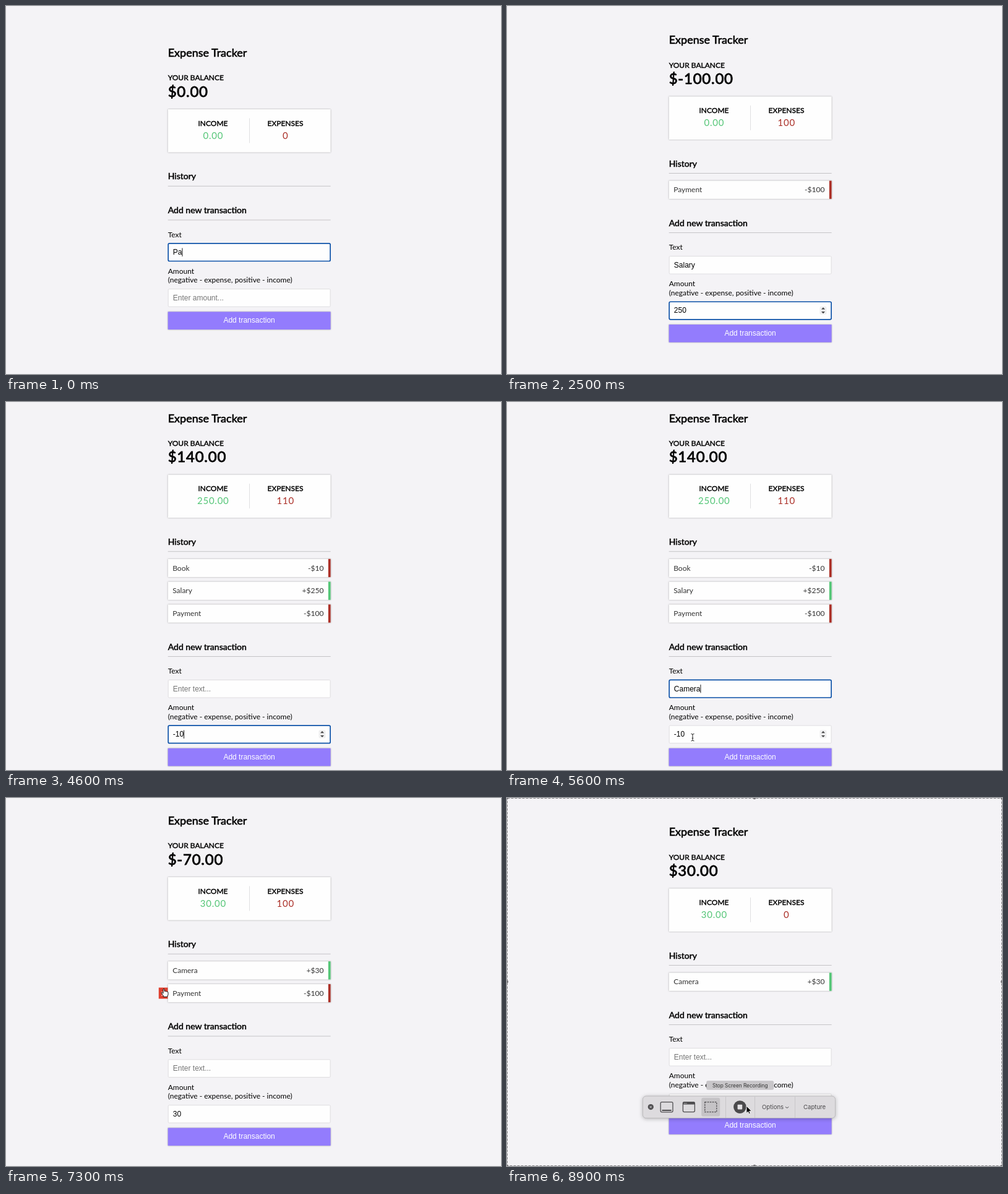
Animation of 800x595 px, one loop 9 s. Source, as an HTML page:

```html
<!DOCTYPE html>
<html lang="en">
<head>
<meta charset="utf-8">
<title>Expense Tracker</title>
<style>
  html, body { margin: 0; width: 100%; height: 100%; overflow: hidden; background: #f4f3f6; }
  svg { display: block; width: 800px; height: 595px; font: 12px Lato, sans-serif; }
  text { white-space: pre; }
  .bold { stroke: #000; stroke-width: .035em; }
  .mid { text-anchor: middle; }
  .end { text-anchor: end; }
  .money { font-size: 15px; letter-spacing: .75px; }
  .arial { font-family: "Liberation Sans", Arial, sans-serif; }
  .ui { font: 9.6px Inter, sans-serif; fill: #4a494b; }
  .raised { filter: drop-shadow(0 .75px .8px rgba(0,0,0,.26)) drop-shadow(0 .3px .8px rgba(0,0,0,.1)); }
  .icon { fill: none; stroke: #4f4e50; stroke-width: 1.3; }
</style>
</head>
<body>
<svg id="stage" viewBox="0 0 800 595"></svg>
<script>
const LOOP = 9000, FRAME = 100;
const LEFT = 261.7, WIDTH = 262.9, RIGHT = LEFT + WIDTH;
const GREEN = '#54c677', RED = '#ab2f27';
const stage = document.getElementById('stage');
const ruler = document.createElement('canvas').getContext('2d');
ruler.font = '12px "Liberation Sans", Arial, sans-serif';

// ---- Script of the session: state changes in order of time ----
const steps = [];
const at = (t, patch) => steps.push({ t, patch });
const typeIn = (t, field, text, every, from = 1) => {
  for (let i = from; i <= text.length; i++)
    at(t + (i - from) * every, { focus: field, [field]: text.slice(0, i) });
};
let history = [];
const add = (t, name, value, focus) => {
  history = [{ name, value }, ...history];
  at(t, { list: history, text: '', focus });
};
const removeSecond = t => {
  history = history.filter((_, i) => i !== 1);
  at(t, { list: history });
};

at(0, { text: 'Pa', amount: '', focus: 'text', list: [] });
typeIn(100, 'text', 'Payment', 60, 3);
at(450, { focus: 'amount' });
typeIn(500, 'amount', '-100', 70);
add(800, 'Payment', -100, 'amount');
at(1000, { focus: 'text' });
typeIn(1100, 'text', 'Salary', 80);
at(1650, { focus: 'amount' });
typeIn(1800, 'amount', '250', 100);
add(2700, 'Salary', 250, 'amount');
at(3000, { focus: 'text' });
typeIn(3200, 'text', 'Book', 100);
at(3700, { focus: 'amount' });
at(3800, { amount: '' });
typeIn(4100, 'amount', '-10', 100);
add(4500, 'Book', -10, 'amount');
at(4800, { focus: 'text' });
typeIn(5000, 'text', 'Camera', 90);
at(5700, { focus: 'amount' });
typeIn(5900, 'amount', '30', 100);
add(6200, 'Camera', 30, '');
[7100, 7300, 7500].forEach(removeSecond);

// Pointer keys: time, x, y, shape
const pointerKeys = [
  [5400, 330, 535, 'beam'], [5500, 300, 542, 'beam'], [5900, 300, 542, 'beam'],
  [6100, 300, 570, 'hand'], [6250, 300, 570, 'hand'], [6400, 262, 470, 'arrow'],
  [6500, 224, 360, 'arrow'], [6700, 255, 304, 'hand'], [7100, 255, 304, 'hand'],
  [7300, 255, 308, 'hand'], [7450, 255, 312, 'hand'], [7600, 252, 315, 'arrow'],
  [8300, 252, 315, 'arrow'], [8600, 387, 498, 'arrow'], [LOOP, 387, 498, 'arrow']
];

function stateAt(t) {
  const state = {};
  for (const step of steps) if (step.t <= t) {
    Object.assign(state, step.patch);
    state.changed = step.t;
  }
  return state;
}

// ---- Drawing helpers ----
const label = (x, y, str, cls = '', extra = '') => `<text x="${x}" y="${y}" class="${cls}" ${extra}>${str}</text>`;
const rect = (x, y, w, h, fill, extra = '') => `<rect x="${x}" y="${y}" width="${w}" height="${h}" fill="${fill}" ${extra}/>`;
const shift = (y, body) => `<g transform="translate(0 ${y})">${body}</g>`;
const path = (d, extra) => `<path d="${d}" ${extra}/>`;
const heading = (y, str) => label(LEFT, y, str, 'bold', 'font-size="14.04"') + rect(LEFT, y + 10.6, WIDTH, .8, '#b8b7ba');

function summary(list) {
  const sum = sign => list.reduce((total, { value }) => total + Math.max(0, sign * value), 0);
  const income = sum(1), spent = sum(-1);
  return label(LEFT, 82, 'Expense Tracker', 'bold', 'font-size="18"')
    + label(LEFT, 120.2, 'YOUR BALANCE', 'bold')
    + label(LEFT, 146.8, '$' + (income - spent).toFixed(2), 'bold', 'font-size="24" letter-spacing=".75"')
    + rect(LEFT, 167, WIDTH, 69.6, '#fefefe', 'class="raised"')
    + rect(393, 181.5, .8, 40, '#d8d7da')
    + label(334.5, 193.8, 'INCOME', 'bold mid') + label(451.5, 193.8, 'EXPENSES', 'bold mid')
    + label(334.8, 214.9, income.toFixed(2), 'money mid', `fill="${GREEN}"`)
    + label(451.8, 214.9, spent, 'money mid', `fill="${RED}"`)
    + heading(280.2, 'History');
}

function row({ name, value }, i, hovered) {
  const y = 303.2 + 36.8 * i;
  const amount = (value < 0 ? '-$' : '+$') + Math.abs(value);
  return (hovered ? rect(246.8, y + 5.6, 14.9, 18, '#e0402f') + label(254.2, y + 18.6, 'x', 'arial mid', 'fill="#fff" font-size="13"') : '')
    + `<g class="raised">${rect(LEFT, y, WIDTH, 29.3, '#fefefe')}${rect(RIGHT - 3.75, y, 3.75, 29.3, value < 0 ? RED : GREEN)}</g>`
    + label(269.2, y + 18.9, name, '', 'fill="#333"') + label(513.4, y + 18.9, amount, 'end', 'fill="#333"');
}

function field(y, value, hint, focused, caret) {
  const border = focused ? 'stroke="#0d52a8" stroke-width="1.7" rx="2"' : 'stroke="#d8d6da" stroke-width=".8" rx="1.4"';
  return rect(LEFT + .5, y + .5, WIDTH - 1, 28.6, '#fefefe', border)
    + label(269.8, y + 18.6, value || hint, 'arial', `fill="${value ? '#000' : '#757575'}"`)
    + (focused && caret ? rect(269.8 + ruler.measureText(value).width, y + 8, .9, 13.5, '#000') : '');
}

const spinner = y => rect(505.5, y - 6.5, 11, 13, '#efeff0', 'rx="2"')
  + path(`M508 ${y - 1.8}l3-3.2 3 3.2zM508 ${y + 1.8}l3 3.2 3-3.2z`, 'fill="#444"');

function form(state, caret, spin) {
  return heading(335, 'Add new transaction')
    + label(LEFT, 373.6, 'Text')
    + field(383.4, state.text, 'Enter text...', state.focus === 'text', caret)
    + label(LEFT, 432.7, 'Amount') + label(LEFT, 447, '(negative - expense, positive - income)')
    + field(457.1, state.amount, 'Enter amount...', state.focus === 'amount', caret)
    + (spin ? spinner(471.6) : '')
    + rect(LEFT, 494.4, WIDTH, 28.7, '#937cfd', 'class="raised"')
    + label(393.1, 512.4, 'Add transaction', 'arial mid', 'fill="#fff"');
}

const shapes = {
  arrow: path('M0 0V11.6L2.7 9.1 4.3 12.8 6.2 12 4.6 8.3H8.2Z', 'fill="#000" stroke="#fff" stroke-width=".8"'),
  beam: path('M-2.5-5.5Q0-5.5 0-4Q0-5.5 2.5-5.5M0-4V4.5M-2.5 6Q0 6 0 4.5Q0 6 2.5 6M-1.2 1.5H1.2', 'fill="none" stroke="#222"'),
  hand: path('M-1 1V8L-2.6 6.4Q-4 6-3.7 7.5L-.8 11.5V13.5H5.5L7 10V6Q6.5 4.8 5 5.2 4.4 4.4 3.2 4.7 2.6 4 1 4.3V1Q0-.6-1 1Z', 'fill="#fff" stroke="#000" stroke-width=".9"')
};

function pointerAt(t) {
  const next = pointerKeys.findIndex(key => key[0] > t);
  if (next < 1) return null;
  const [t0, x0, y0, shape] = pointerKeys[next - 1], [t1, x1, y1] = pointerKeys[next];
  const p = (t - t0) / (t1 - t0);
  return { x: x0 + (x1 - x0) * p, y: y0 + (y1 - y0) * p, shape };
}

function recorder(tooltip) {
  const handles = [[0, 0], [400, 0], [800, 0], [0, 297], [800, 297], [0, 595], [400, 595], [800, 595]];
  const divider = x => rect(x, 483, .8, 34, '#c3c1c4');
  return rect(.5, .5, 799, 594, 'none', 'stroke="#858487" stroke-dasharray="4 2"')
    + handles.map(([x, y]) => `<circle cx="${x}" cy="${y}" r="2.2" fill="#777679"/>`).join('')
    + rect(219.4, 482, 311.2, 35.6, '#dddbde', 'rx="5.5" stroke="#b3b1b4" stroke-width=".8" style="filter:drop-shadow(0 1px 3px #0004)"')
    + '<circle cx="232.3" cy="499.6" r="4.6" fill="#4f4e50"/>'
    + path('M230.6 497.9l3.4 3.4m0-3.4l-3.4 3.4', 'stroke="#dddbde"')
    + rect(248.2, 491.6, 19.8, 16.2, 'none', 'class="icon" rx="2"') + rect(250.5, 504, 15.2, 2, '#4f4e50')
    + rect(284.4, 491.6, 19, 16, 'none', 'class="icon" rx="2"') + rect(284.4, 491.6, 19, 4, '#4f4e50', 'rx="1"')
    + path('M286 493.6h4.5', 'stroke="#dddbde" stroke-dasharray="1 .8"')
    + rect(314.2, 484.8, 30, 30, '#c5c3c6', 'rx="3"')
    + rect(319.8, 491.7, 19, 16, 'none', 'class="icon" stroke-dasharray="2.6 1.4"')
    + divider(353) + divider(400) + divider(465)
    + '<circle cx="376.4" cy="499.6" r="10.3" fill="#4b4a4c"/>' + rect(372.6, 495.8, 7.6, 7.6, '#e4e2e5', 'rx=".8"')
    + label(412, 503.2, 'Options', 'ui') + path('M450 499.3l2.6 2 2.6-2', 'fill="none" stroke="#4a494b"')
    + label(479, 503.2, 'Capture', 'ui')
    + (tooltip ? rect(322.6, 457.6, 108.2, 14, '#c8c6c9', 'rx="2" stroke="#bbb9bc" stroke-width=".5"')
      + label(376.7, 467.6, 'Stop Screen Recording', 'ui mid', 'style="font-size:8.25px;fill:#333"') : '');
}

function render(t) {
  const state = stateAt(t), pointer = pointerAt(t), n = state.list.length;
  // The page stays centred until it is too tall, then sticks to the top margin.
  const listHeight = n ? 41.3 + 36.8 * (n - 1) : 0;
  const top = Math.max(-49.4, -listHeight / 2);
  const caret = (t - state.changed) % 1000 < 500;
  const spin = state.focus === 'amount' || pointer?.shape === 'beam';
  const hovering = t >= 6700 && t < 7500;
  stage.innerHTML = shift(top, summary(state.list) + state.list.map((item, i) => row(item, i, hovering && i === 1)).join(''))
    + shift(top + listHeight, form(state, caret, spin))
    + (t >= 8200 ? recorder(t >= 8700) : '')
    + (pointer ? `<g transform="translate(${pointer.x} ${pointer.y})">${shapes[pointer.shape]}</g>` : '');
}

let shown = -1;
const start = performance.now();
function tick() {
  const frame = Math.floor((performance.now() - start) % LOOP / FRAME);
  if (frame !== shown) render((shown = frame) * FRAME);
  requestAnimationFrame(tick);
}
tick();
</script>
</body>
</html>
```
